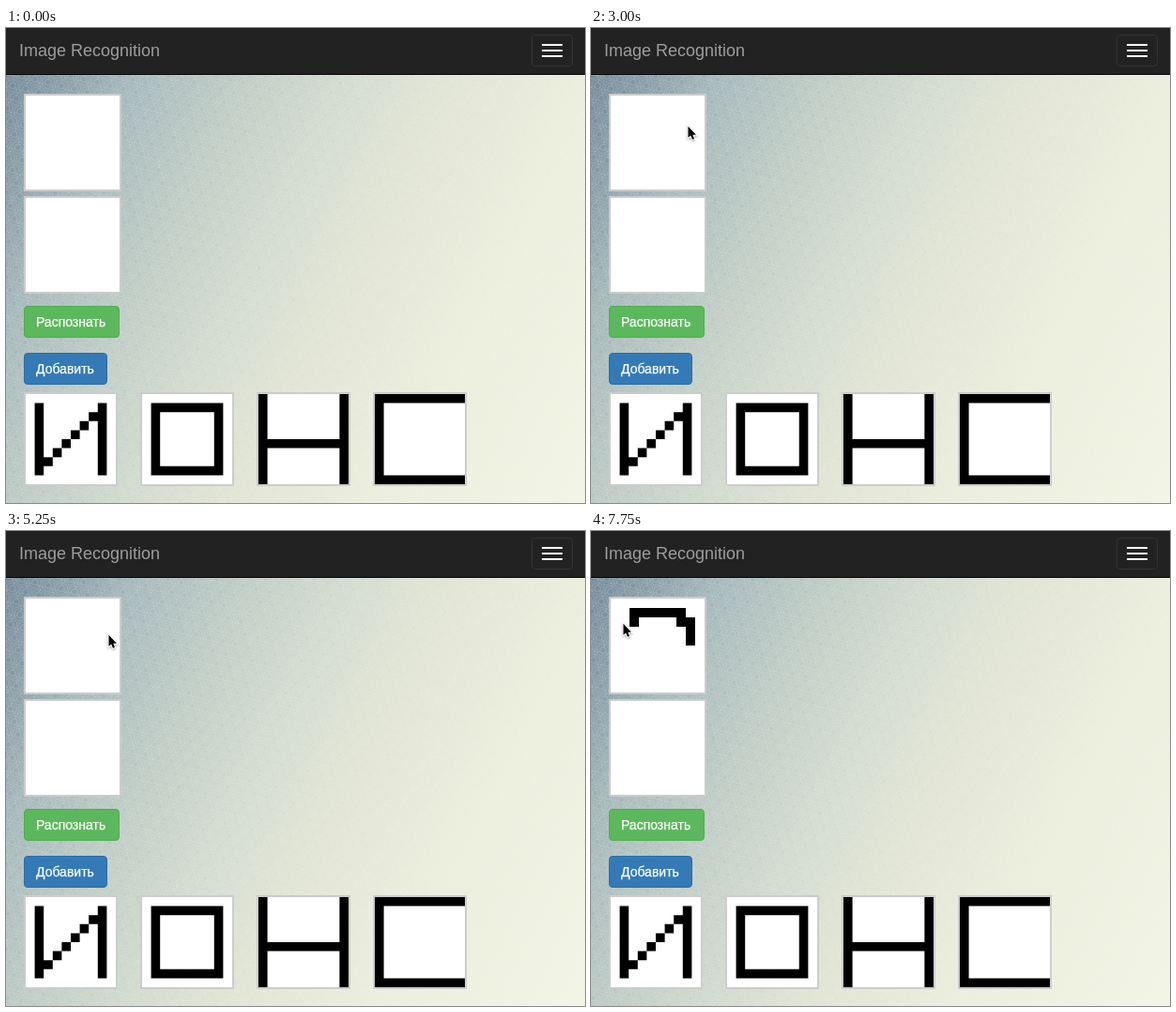
Recreate the animation shown at these times as an HTML page. Size 617 by 506 pixels, loop 8000 ms.

```html
<!DOCTYPE html>
<html lang="ru">
<head>
<meta charset="utf-8">
<title>Image Recognition</title>
<style>
  html, body { margin: 0; width: 100%; height: 100%; overflow: hidden; }
  body { background: linear-gradient(117deg, #72899b, #879da9 8%, #a3b6bb 16%, #bdcbc6 30%, #d0d9cf 42%, #dfe3d5 54%, #ebedde 73%, #f2f4e6) 0 50px / 617px 456px no-repeat; }
  svg { display: block; width: 617px; height: 506px; }
  text { font-family: "Liberation Sans", Arial, sans-serif; font-size: 14px; fill: #fff; stroke: #fff; stroke-width: .25px; }
  .brand { font-size: 18px; fill: #9d9d9d; stroke: none; }
  .box { fill: #fff; stroke: #ccc; stroke-width: 2; }
  #cursor { filter: drop-shadow(0 1px 1px rgba(0, 0, 0, .35)); }
</style>
</head>
<body>
<svg viewBox="0 0 617 506">
  <defs>
    <pattern id="lace" width="18" height="31.2" patternUnits="userSpaceOnUse" patternTransform="rotate(14) scale(.8)">
      <g id="rosette" fill="none" stroke="#f6f6e0" stroke-opacity=".3">
        <path d="M9 1.2 16.6 5.5V14.3L9 18.6 1.4 14.3V5.5Z"/>
        <circle cx="9" cy="9.9" r="4.2"/>
        <path d="M9 1.2V5.7M16.6 14.3 12.6 12M1.4 14.3 5.4 12"/>
      </g>
      <use href="#rosette" x="9" y="15.6"/>
      <use href="#rosette" x="-9" y="15.6"/>
      <use href="#rosette" x="9" y="-15.6"/>
      <use href="#rosette" x="-9" y="-15.6"/>
    </pattern>
  </defs>
  <rect y="50" width="617" height="456" fill="url(#lace)"/>

  <rect width="617" height="50" fill="#222"/>
  <rect y="49" width="617" height="1" fill="#080808"/>
  <text class="brand" x="14" y="30">Image Recognition</text>
  <rect x="560.5" y="7.5" width="43" height="33" rx="3.5" fill="none" stroke="#333"/>
  <path d="M571 18h22m-22 6h22m-22 6h22" stroke="#fff" stroke-width="2"/>

  <rect class="box" x="20" y="71" width="102" height="102"/>
  <rect class="box" x="20" y="180" width="102" height="102"/>

  <rect x="19.5" y="296.5" width="101" height="33" rx="3.5" fill="#5cb85c" stroke="#4cae4c"/>
  <text x="32" y="318">Распознать</text>
  <rect x="19.5" y="346.5" width="88" height="33" rx="3.5" fill="#337ab7" stroke="#2e6da4"/>
  <text x="32" y="368">Добавить</text>

  <g id="samples"></g>
  <path id="stroke" transform="translate(21 72) scale(10)" d="M8.5 5V2.5H7.5V1.5H2.5V3" fill="none" stroke="#000"/>
  <path id="cursor" d="M.5.7V12.8L3.2 10.4 5 14.7 7 13.9 5.3 9.7H8.9Z" stroke="#fff" stroke-width="2" paint-order="stroke"/>
</svg>
<script>
  const LOOP = 8000, STEP = 250, GRID = 10;
  const $ = id => document.getElementById(id);

  // each sample letter is a rule for which grid cells are inked
  const inner = n => n > 0 && n < 9;
  const edge = n => n === 1 || n === 8;
  const letters = [
    (c, r) => inner(r) && (edge(c) || inner(c) && c + r === 9),
    (c, r) => inner(c) && inner(r) && (edge(c) || edge(r)),
    (c, r) => c === 0 || c === 9 || r === 5,
    (c, r) => c === 0 || r === 0 || r === 9
  ];
  $('samples').innerHTML = letters.map((inked, i) => {
    let d = '';
    for (let r = 0; r < GRID; r++)
      for (let c = 0; c < GRID; c++)
        if (inked(c, r)) d += `M${c} ${r}h1v1h-1z`;
    const x = 20 + 124 * i;
    return `<rect class="box" x="${x}" y="389" width="98" height="98"/>
      <path transform="translate(${x + 1} 390) scale(9.6)" d="${d}"/>`;
  }).join('');

  // the pointer visits twice: [time, x, y] of the tip at turning points
  const visits = [
    [[250, 320, 94], [1000, 105, 100], [2000, 103, 104], [3250, 103, 104], [3500, 327, 10]],
    [[4500, 220, 123], [4750, 115, 157], [5250, 109, 110], [5750, 103, 111], [6000, 95, 99],
     [6500, 100, 120], [6750, 100, 120], [7000, 95, 99], [7500, 51, 86], [7750, 34, 98]]
  ];
  const smooth = p => p * p * (3 - 2 * p);
  const ease = p => smooth(p ** .85);

  function pointer(t) {
    const keys = visits.find(v => t >= v[0][0] && t <= v[v.length - 1][0]);
    if (!keys) return null;
    const i = Math.max(1, keys.findIndex(k => k[0] >= t));
    const [t0, x0, y0] = keys[i - 1], [t1, x1, y1] = keys[i];
    const p = ease((t - t0) / (t1 - t0));
    return [x0 + (x1 - x0) * p, y0 + (y1 - y0) * p].map(Math.round);
  }

  function render(t) {
    const tip = pointer(t);
    $('cursor').setAttribute('visibility', tip ? 'visible' : 'hidden');
    if (tip) $('cursor').setAttribute('transform', `translate(${tip})`);

    // the stroke is eleven cells long and grows by whole cells
    const drawn = Math.floor(11 * smooth(Math.max(0, (t - 6500) / 1250)));
    $('stroke').setAttribute('visibility', drawn ? 'visible' : 'hidden');
    $('stroke').setAttribute('stroke-dasharray', `${drawn} 20`);
  }

  let shown = -1;
  function tick() {
    const t = Math.floor(performance.now() % LOOP / STEP) * STEP;
    if (t !== shown) render(shown = t);
    requestAnimationFrame(tick);
  }
  tick();
</script>
</body>
</html>
```
